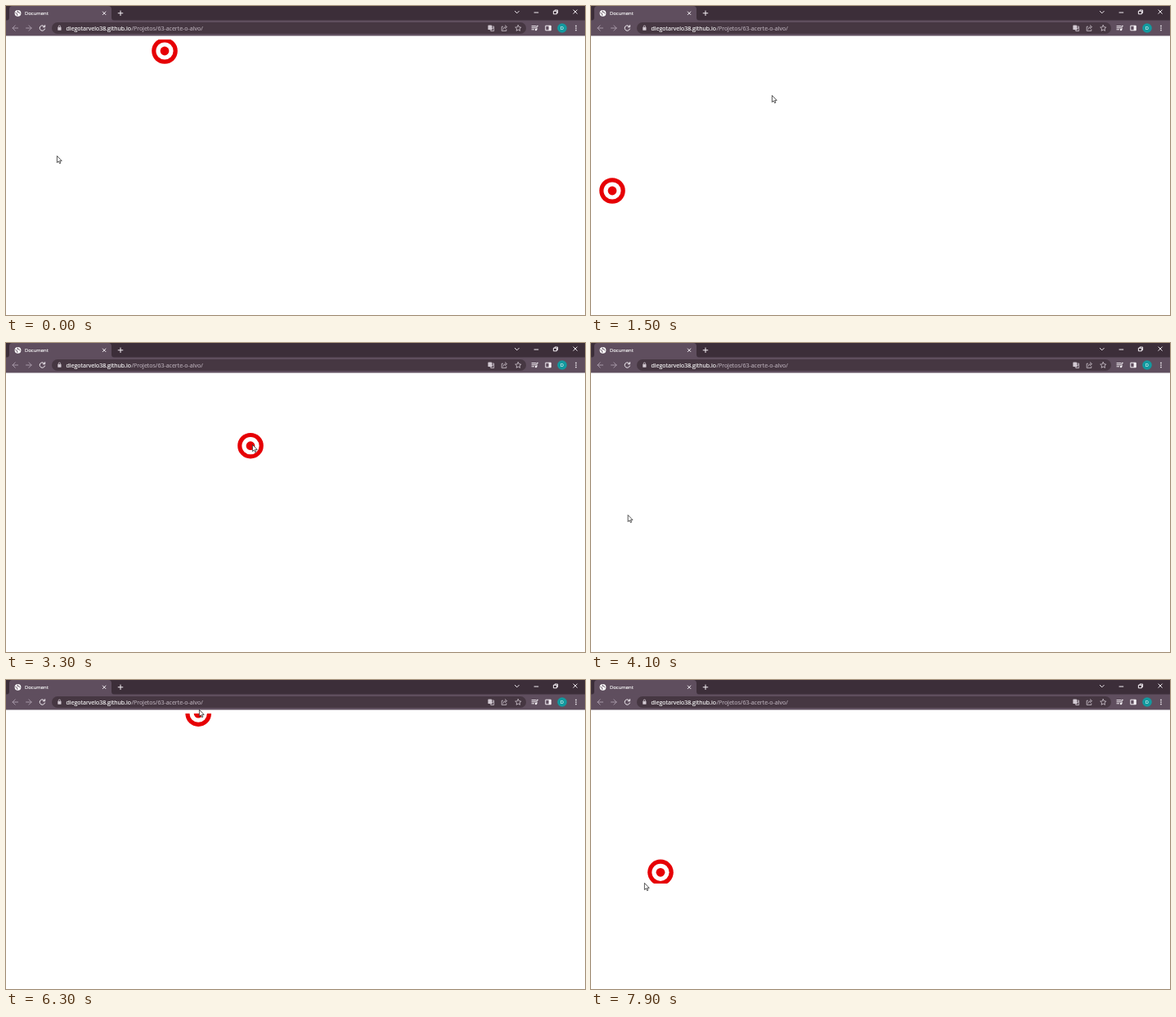
An HTML page that plays this animation: 708x378 px, repeating every 8 s.

```html
<!DOCTYPE html>
<html lang="pt">
<head>
<meta charset="utf-8">
<title>Document</title>
<style>
  html, body { margin: 0; width: 100%; height: 100%; overflow: hidden; background: #fff; }
  svg { display: block; width: 100vw; height: 100vh; }
  text { font-family: "Open Sans", "Noto Sans", sans-serif; fill: #fff; stroke: #fff; stroke-width: .12; }
  .path { fill: #b9aeb8; stroke: #b9aeb8; }
  .line { fill: none; stroke: #f4eff4; stroke-linecap: round; stroke-linejoin: round; }
  .dim { stroke: #a597a6; }
  .soft { stroke: #d2c9d2; stroke-width: .8; }
</style>
</head>
<body>
<svg viewBox="0 0 708 378">
  <defs>
    <clipPath id="area"><rect y="41" width="708" height="208"/></clipPath>
  </defs>

  <g id="tabs">
    <rect width="708" height="18" fill="#3c2e39"/>
    <path d="M0 18Q4 18 4 14V4Q4 0 8 0H125Q129 0 129 4V14Q129 18 133 18Z" fill="#5f4e5e"/>
    <circle cx="14.5" cy="8.8" r="3.9" fill="#fff"/>
    <path d="M11.4 8.2l2.2 1.3.3 2.2M14.3 5.6l-.4 1.6 2 .7 1.4 1.3" fill="none" stroke="#5f4e5e"/>
    <text x="23" y="11" font-size="5.9">Document</text>
    <path class="line" d="M118.3 7l3.6 3.6m0-3.6l-3.6 3.6"/>
    <path class="line" d="M137.2 8.8h5.6M140 6v5.6"/>
    <path class="line" d="M622.4 6.4l2.4 2.4 2.4-2.4"/>
    <path class="line" d="M646 8h4.8"/>
    <path class="line" d="M669.8 6.2h3.6v3.6h-3.6zM671 6V5h3.6v3.6h-1"/>
    <path class="line" d="M693.9 4.9l4.4 4.4m0-4.4l-4.4 4.4"/>
  </g>

  <g id="toolbar">
    <rect y="17.5" width="708" height="19" fill="#5f4e5e"/>
    <rect x="56" y="20" width="580" height="14" rx="7" fill="#463742"/>
    <path class="line dim" d="M14.6 27H8m3.2-3.2L8 27l3.2 3.2"/>
    <path class="line dim" d="M24.6 27h6.6m-3.2-3.2l3.2 3.2-3.2 3.2"/>
    <path class="line" d="M47.2 25.4a3.2 3.2 0 1 0 .3 2.6M47.6 23.6v2.2h-2.2"/>
    <rect x="63.3" y="26" width="4.2" height="3.8" rx=".5" fill="#d2c9d2"/>
    <path class="line soft" d="M64.2 26v-.8a1.2 1.2 0 0 1 2.4 0v.8"/>
    <text x="73.5" y="29.6" font-size="7">diegotarvelo38.github.io</text>
    <text x="153.4" y="29.6" font-size="7" class="path">/Projetos/63-acerte-o-alvo/</text>
    <rect x="589.4" y="23.4" width="4.6" height="5.6" rx=".6" fill="#d2c9d2"/>
    <path class="line soft" d="M594.2 25h2.4v5.6h-3.8l-.6-1.4M593.8 27h2.2m-1 0l-1 2.4"/>
    <path class="line soft" d="M607.6 25.2h-1.4v5.2h5.6v-1.6M607.8 28.4q.4-2.6 3-2.8M610.4 23.8l2.2 1.8-2.2 1.9"/>
    <path class="line soft" d="M626.3 23.5l1.1 2.3 2.5.3-1.9 1.7.5 2.5-2.2-1.3-2.2 1.3.5-2.5-1.9-1.7 2.5-.3z"/>
    <path class="line" d="M643 24.6h4.8M643 26.7h4.8M643 28.8h2.6M649 28.8v-4.4h1.4"/>
    <circle cx="648" cy="29" r="1.2" fill="#f4eff4"/>
    <path class="line" d="M660.2 24.2h6v5.6h-6z"/>
    <path d="M663.6 24h2.8v6h-2.8z" fill="#f4eff4"/>
    <circle cx="680" cy="27" r="5.8" fill="#129a9f"/>
    <text x="680" y="28.9" font-size="5.2" text-anchor="middle">D</text>
    <path class="line" d="M697 24.4v5.3" stroke-width="1.7" stroke-dasharray="0 2.6"/>
  </g>

  <g clip-path="url(#area)">
    <g id="target">
      <circle r="15.8" fill="#e60005"/>
      <circle r="10.6" fill="#fff"/>
      <circle r="5.4" fill="#e60005"/>
    </g>
  </g>
  <path id="cursor" d="M.4.4V8.6L2.3 6.9 3.6 9.7 4.9 9.1 3.7 6.4H6.2Z" fill="#fff" stroke="#222" stroke-width=".75" stroke-linejoin="round"/>
</svg>

<script>
const LOOP = 8000, STEP = 100;
const target = document.getElementById("target");
const cursor = document.getElementById("cursor");

// A new spot every second; some spots fall outside the play area.
const spots = [
  [194, 55], null, [26, 226], [299, 125.7], null, [292, 93.5], [235.2, 41.2], null, [85, 235.3]
];

// Cursor moves: start, end, x, y; it rests in between.
const home = [62, 183];
const moves = [
  [200, 300, 194, 55], [400, 500, 213, 101], [1200, 1500, 221, 109],
  [1700, 1900, 206, 124], [2000, 2400, 121, 183], [2400, 3300, 301, 124],
  [3400, 3600, 41, 212], [3900, 4600, 60, 202], [4800, 4900, 177, 138],
  [4900, 5600, 300, 96], [5900, 6300, 236, 36], [6800, 7500, 158, 81],
  [7700, 7900, 65, 248]
];

const clamp = v => Math.min(1, Math.max(0, v));
const ease = f => f * f * (3 - 2 * f);

function pointer(t) {
  let [x, y] = home;
  for (const [start, end, toX, toY] of moves) {
    const f = ease(clamp((t - start) / (end - start)));
    x += (toX - x) * f;
    y += (toY - y) * f;
  }
  return [x, y];
}

function place(el, p) {
  el.style.display = p ? "" : "none";
  if (p) el.setAttribute("transform", `translate(${p[0]} ${p[1]})`);
}

function draw(now) {
  const t = Math.floor((now % LOOP) / STEP) * STEP;
  place(target, spots[Math.floor((t + 500) / 1000)]);
  place(cursor, pointer(t));
}

function tick(now) {
  draw(now);
  requestAnimationFrame(tick);
}
draw(0);
requestAnimationFrame(tick);
</script>
</body>
</html>
```
